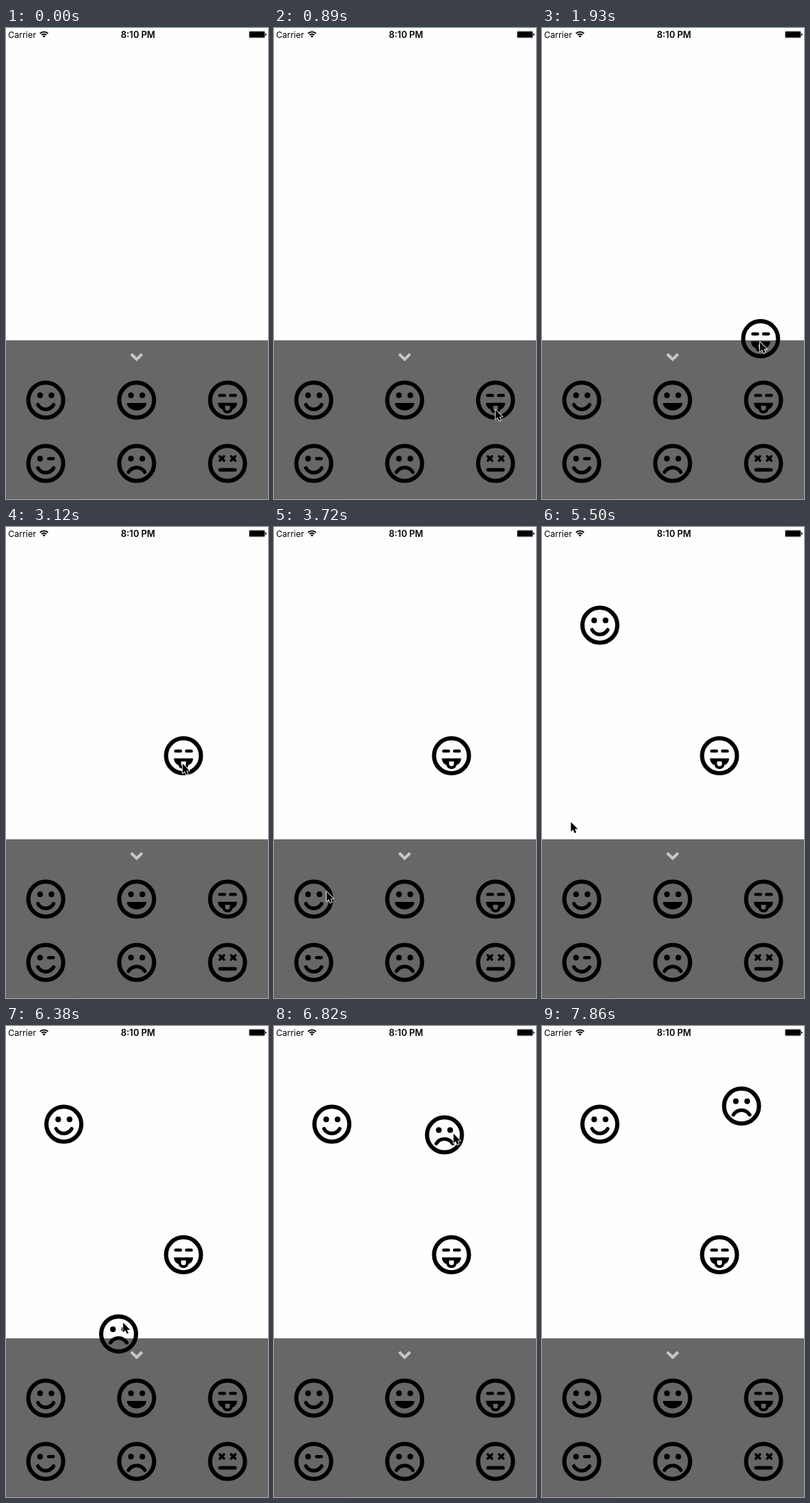
An HTML page with a canvas for the animation above (8 s loop, 369 by 662 pixels).

```html
<!DOCTYPE html>
<html lang="en">
<head>
<meta charset="utf-8">
<title>Smiley drag</title>
<style>
html, body { margin: 0; width: 100%; height: 100%; overflow: hidden; background: #fefefe; }
canvas { display: block; width: 369px; height: 662px; }
</style>
</head>
<body>
<canvas id="stage"></canvas>
<script>
const W = 369, H = 662, LOOP = 8000, TAU = Math.PI * 2;
const TICK = 148, LAG = 0.1;
const canvas = document.getElementById('stage');
const ctx = canvas.getContext('2d');
const ratio = window.devicePixelRatio || 1;
canvas.width = Math.round(W * ratio);
canvas.height = Math.round(H * ratio);

const easeInOut = u => u * u * (3 - 2 * u);
const easeOut = u => u * (2 - u);

// The pointer follows one curve per move, starting where the last one ended.
// A dragged face trails the pointer and settles at `rest`.
const moves = [
  { from: 300, to: 890, bend: [220, 560], end: [311, 535.5] },
  { from: 1630, to: 2370, bend: [332, 448], end: [249, 330], face: 'tongue', rest: [250, 321.5] },
  { from: 3120, to: 3720, bend: [252, 328], end: [73, 511.5] },
  { from: 4160, to: 4760, bend: [60, 11], end: [97, 116], face: 'smile', rest: [59 + 22.5, 138] },
  { from: 5200, to: 6230, bend: [-57, 690], end: [190, 609] },
  { from: 6380, to: 7110, bend: [107, 263], end: [289, 115], face: 'sad', rest: [281, 112.5], ease: easeOut },
  { from: 7410, to: 7860, bend: [292, 300], end: [284, 700] }
];

const curve = (a, b, c, p) =>
  a.map((v, k) => v * (1 - p) ** 2 + 2 * b[k] * p * (1 - p) + c[k] * p * p);

// Pointer and face of one move at time t, advancing in even ticks.
function pose(move, start, t) {
  const { from, to, bend, end, rest, ease = easeInOut } = move;
  const count = Math.round((to - from) / TICK) + 1;
  const gap = (to - from) / (count - 1);
  const step = Math.min(count, Math.floor((t - from) / gap + 0.01) + 1);
  const at = i => curve(start, bend, end, ease(i / count));
  const tip = at(step);
  if (!rest) return { tip };
  const before = step < count ? at(step - 1) : tip;
  return { tip, spot: tip.map((v, k) => v - (end[k] - rest[k]) - LAG * (v - before[k])) };
}

function line(points, width) {
  ctx.lineWidth = width;
  ctx.beginPath();
  points.forEach(([x, y]) => ctx.lineTo(x, y));
  ctx.stroke();
}

function disc(x, y, r) {
  ctx.beginPath();
  ctx.arc(x, y, r, 0, TAU);
  ctx.fill();
}

function arc(y, r, a, b, width) {
  ctx.lineWidth = width;
  ctx.beginPath();
  ctx.arc(0, y, r, a, b);
  ctx.stroke();
}

const dash = (x, y, half, width) => line([[x - half, y], [x + half, y]], width);
const smileMouth = () => arc(0.4, 12.6, 0.5, Math.PI - 0.5, 5);

function eyes() {
  disc(-8, -6.7, 4);
  disc(8, -6.7, 4);
}

function crossEye(x) {
  line([[x - 3, -10], [x + 3, -4]], 3.4);
  line([[x + 3, -10], [x - 3, -4]], 3.4);
}

function openMouth() {
  ctx.beginPath();
  ctx.ellipse(0, 4.5, 13, 9.3, 0, 0, Math.PI);
  ctx.closePath();
  ctx.fill();
  ctx.lineJoin = 'round';
  ctx.lineWidth = 1.2;
  ctx.stroke();
}

// Tongue: a black lobe below the mouth with a see-through middle.
function tongueMouth() {
  ctx.beginPath();
  ctx.moveTo(-13.5, 3.8);
  ctx.lineTo(13.5, 3.8);
  ctx.bezierCurveTo(13.5, 8, 11, 12, 7, 13);
  ctx.bezierCurveTo(6, 20.5, -6, 20.5, -7, 13);
  ctx.bezierCurveTo(-11, 12, -13.5, 8, -13.5, 3.8);
  ctx.closePath();
  ctx.moveTo(-3.4, 8);
  ctx.lineTo(3.4, 8);
  ctx.lineTo(3.4, 11.5);
  ctx.bezierCurveTo(3.4, 15.8, -3.4, 15.8, -3.4, 11.5);
  ctx.closePath();
  ctx.fill('evenodd');
}

const features = {
  smile() { eyes(); smileMouth(); },
  grin() { eyes(); openMouth(); },
  tongue() {
    dash(-7.6, -6.6, 3.4, 4.4);
    dash(7.6, -6.6, 3.4, 4.4);
    tongueMouth();
  },
  wink() { disc(-8, -6.7, 4); dash(7.3, -6.7, 3.2, 4.6); smileMouth(); },
  sad() { eyes(); arc(19.2, 13.4, Math.PI + 0.54, -0.54, 5); },
  dead() { crossEye(-8); crossEye(8); dash(0, 9, 10.5, 5); }
};

function face(kind, x, y) {
  ctx.save();
  ctx.translate(x, y);
  ctx.fillStyle = ctx.strokeStyle = '#000';
  ctx.lineCap = 'round';
  arc(0, 24.6, 0, TAU, 5.9);
  features[kind]();
  ctx.restore();
}

function statusBar() {
  ctx.fillStyle = ctx.strokeStyle = '#000';
  ctx.textAlign = 'left';
  ctx.font = '400 12px Inter, Roboto, sans-serif';
  ctx.fillText('Carrier', 3, 13.5);
  ctx.textAlign = 'center';
  ctx.font = '600 12.5px Inter, Roboto, sans-serif';
  ctx.fillText('8:10 PM', 186, 13.5);

  ctx.save();
  ctx.translate(53.5, 13.4);
  for (const r of [8, 4.9]) arc(0, r, -Math.PI * 0.75, -Math.PI * 0.25, 1.8);
  ctx.beginPath();
  ctx.moveTo(0, 0);
  ctx.arc(0, 0, 2.8, -Math.PI * 0.75, -Math.PI * 0.25);
  ctx.fill();
  ctx.restore();

  ctx.lineWidth = 1;
  ctx.strokeStyle = '#808080';
  ctx.beginPath();
  ctx.roundRect(342.5, 4.7, 22, 9, 1.5);
  ctx.stroke();
  ctx.fillRect(343, 5.2, 21, 8);
  ctx.beginPath();
  ctx.arc(365.2, 9.2, 1.6, -Math.PI / 2, Math.PI / 2);
  ctx.fill();
}

function tray() {
  ctx.fillStyle = '#676767';
  ctx.fillRect(0, 439, W, H - 439);
  ctx.fillStyle = '#655a60';
  ctx.fillRect(0, 661, 105, 1);
  Object.keys(features).forEach((kind, i) =>
    face(kind, 56 + 128 * (i % 3), 523 + 89 * Math.floor(i / 3)));
}

function chevron() {
  ctx.strokeStyle = '#c6c6c6';
  line([[176.3, 458.3], [184, 465.8], [191.7, 458.3]], 4);
}

function arrow(x, y) {
  ctx.save();
  ctx.translate(x + 1, y + 1);
  ctx.scale(0.9, 0.9);
  ctx.beginPath();
  [[0, 0], [0, 15], [3.4, 11.9], [5.8, 17.3], [8.4, 16.2], [6.1, 11], [10.8, 11]]
    .forEach(([px, py]) => ctx.lineTo(px, py));
  ctx.closePath();
  ctx.lineJoin = 'round';
  ctx.lineWidth = 1.9;
  ctx.strokeStyle = '#fff';
  ctx.stroke();
  ctx.fillStyle = '#000';
  ctx.fill();
  ctx.restore();
}

function draw(t) {
  ctx.setTransform(ratio, 0, 0, ratio, 0, 0);
  ctx.fillStyle = '#fefefe';
  ctx.fillRect(0, 0, W, H);
  statusBar();
  tray();
  let pointer = [W, H];
  for (const move of moves) {
    if (t < move.from) break;
    const { tip, spot } = pose(move, pointer, t);
    if (spot) face(move.face, ...spot);
    pointer = tip;
  }
  chevron();
  arrow(...pointer);
}

const begin = performance.now();
function tick() {
  draw((performance.now() - begin) % LOOP);
  requestAnimationFrame(tick);
}
tick();
</script>
</body>
</html>
```
